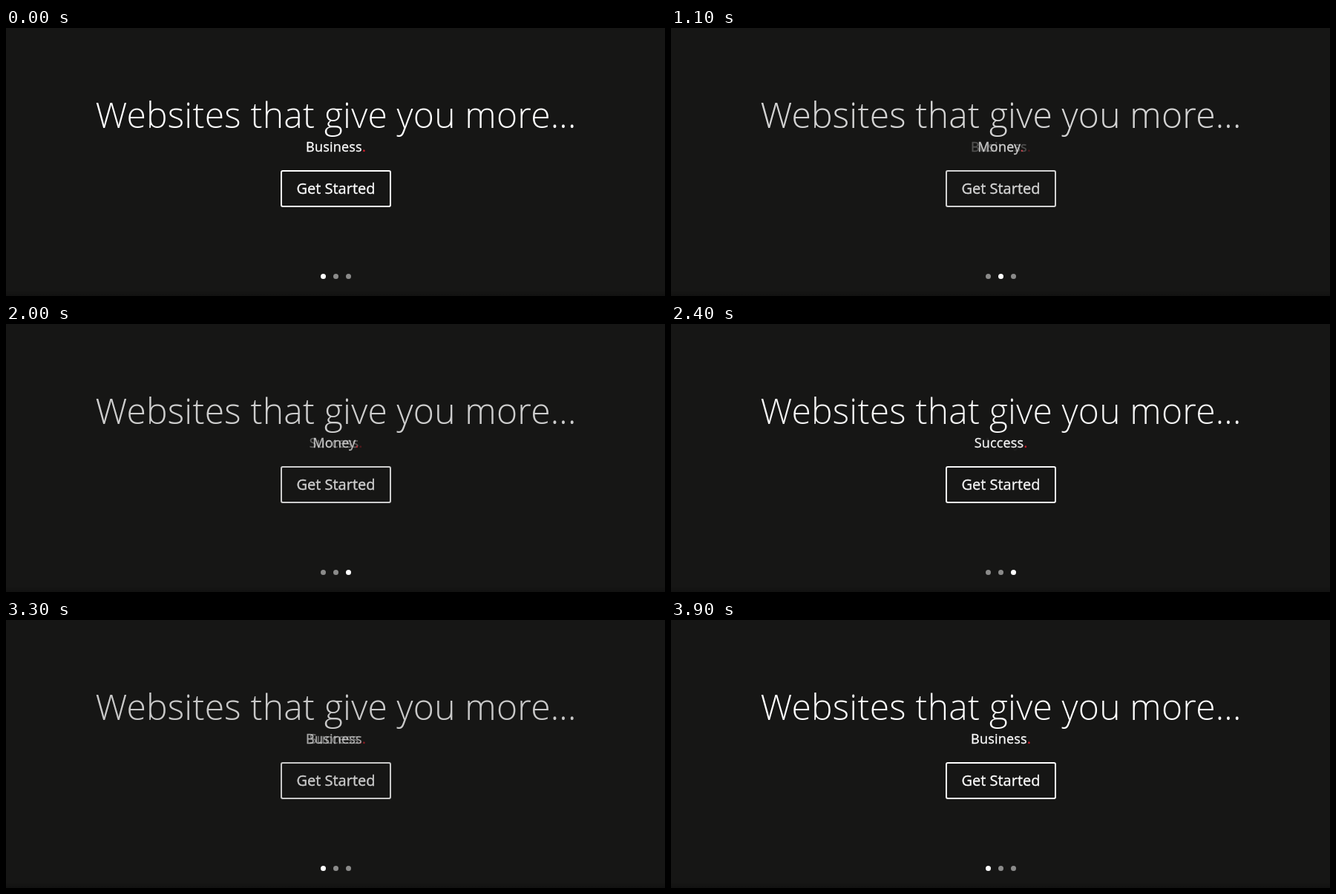
Recreate the animation shown at these times as an HTML page. Size 888 px wide and 362 px high, loop 4 s.

```html
<!DOCTYPE html>
<html lang="en">
<head>
<meta charset="utf-8">
<title>Slider</title>
<style>
  html, body { margin: 0; width: 100%; height: 100%; overflow: hidden; background: #161615; }
  svg { display: block; width: 888px; height: 362px; }
  text { font-family: "Open Sans", "Noto Sans", sans-serif; fill: #fff; text-anchor: middle; }
  .title { font-size: 48px; font-weight: 300; letter-spacing: .2px; }
  .word, .label { stroke: #fff; stroke-width: .3; }
  .word { font-size: 18px; letter-spacing: .2px; }
  .word tspan { fill: #dc1f2e; stroke: #dc1f2e; }
  .label { font-size: 20px; }
  .button { fill: none; stroke: #fff; stroke-width: 2; }
  .dots circle { fill: #fff; fill-opacity: .5; }
  .dots .on { fill-opacity: 1; }
</style>
</head>
<body>
<svg viewBox="0 0 888 362">
  <defs>
    <linearGradient id="shade" x2="0" y2="1">
      <stop offset="0" stop-color="#000" stop-opacity="0"/>
      <stop offset="1" stop-color="#000" stop-opacity=".2"/>
    </linearGradient>
  </defs>
  <rect width="888" height="362" fill="#161615"/>
  <rect y="354" width="888" height="8" fill="url(#shade)"/>
  <g id="slides"></g>
  <g id="dots" class="dots"></g>
</svg>
<script>
const LOOP = 4000, TICK = 100, MID = 444.5;
const words = ['Business', 'Money', 'Success'];

// The dot switches at `at`; the crossfade began `lead` ms before it.
const fades = [
  { at: 500, lead: 100, end: 1450 },
  { at: 1800, lead: 100, end: 2500 },
  { at: 2800, lead: 50, end: 3700 }
];

const slide = word => `<g>
  <text class="title" x="${MID}" y="135">Websites that give you more...</text>
  <text class="word" x="${MID}" y="167">${word}<tspan>.</tspan></text>
  <rect class="button" x="371" y="193" width="147" height="48" rx="2"/>
  <text class="label" x="${MID}" y="224">Get Started</text>
</g>`;

const slideBox = document.getElementById('slides');
const dotBox = document.getElementById('dots');
// Earlier slides lie on top of later ones.
slideBox.innerHTML = words.slice().reverse().map(slide).join('');
dotBox.innerHTML = words.map((_, i) =>
  `<circle cx="${MID - 17 + 17 * i}" cy="335.5" r="3.5"/>`).join('');
const slides = [...slideBox.children].reverse();
const dots = [...dotBox.children];

const swing = p => 0.5 - Math.cos(Math.PI * Math.min(1, p)) / 2;

function draw(time) {
  const t = Math.floor((time % LOOP) / TICK) * TICK;
  const alpha = [1, 0, 0];
  let active = 0;
  fades.forEach(({ at, lead, end }, i) => {
    if (t < at) return;
    const p = swing((t - at + lead) / (end - at + lead));
    active = (i + 1) % words.length;
    alpha.fill(0);
    alpha[i] = 1 - p;
    alpha[active] = p;
  });
  slides.forEach((s, i) => s.setAttribute('opacity', alpha[i]));
  dots.forEach((d, i) => d.classList.toggle('on', i === active));
}

const start = performance.now();
function frame() {
  draw(performance.now() - start);
  requestAnimationFrame(frame);
}
frame();
</script>
</body>
</html>
```
